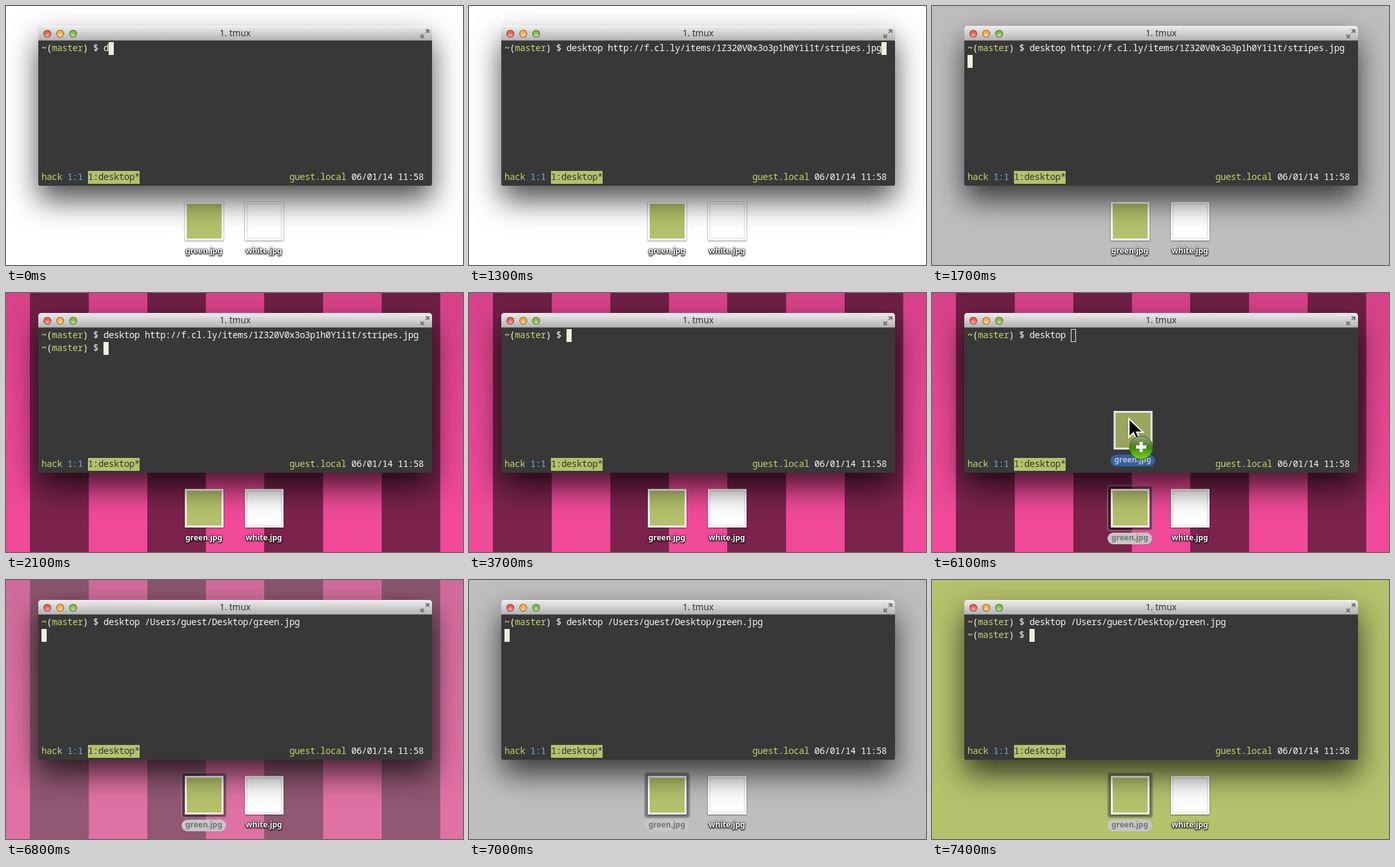
These frames come from a looping animation (708x402 px, 8 s). An HTML page:

```html
<!DOCTYPE html>
<html lang="en">
<head>
<meta charset="utf-8">
<title>Desktop from the terminal</title>
<style>
  html, body { margin: 0; width: 100%; height: 100%; overflow: hidden; }
  body { position: relative; background: #fff; font-family: "Noto Sans", "Open Sans", sans-serif; }
  div, svg { position: absolute; box-sizing: border-box; }
  .wallpaper { inset: 0; }
  #stripes {
    left: -144.5px;
    background:
      linear-gradient(rgba(0, 0, 0, .1), transparent 85%),
      repeating-linear-gradient(90deg, #7b234c 0 90.2px, #f04a98 91.3px 181px, #7b234c 181.5px);
  }
  #green { background: #b4c26c; }
  #gray { background: #bebebe; }

  .file { top: 304px; width: 60px; height: 60px; }
  .picture {
    inset: 0; border: 3px solid #fff; background: var(--fill);
    box-shadow: 0 0 1px rgba(0, 0, 0, .5), 0 1px 2px rgba(0, 0, 0, .4);
  }
  .picture.framed { box-shadow: 0 0 1px rgba(0, 0, 0, .5), 0 1px 2px rgba(0, 0, 0, .4), inset 0 0 0 1px #ddd; }
  .label {
    left: -5px; top: 68px; width: 69px; height: 18px; border-radius: 9px;
    font-weight: bold; font-size: 12px; line-height: 15px; text-align: center;
    color: #fff; text-shadow: 0 1px 2px #000, 0 0 3px #000, 0 1px 3px rgba(0, 0, 0, .7);
  }
  .selected::before {
    content: ""; position: absolute; inset: -6px; border-radius: 5px;
    border: 2px solid rgba(140, 140, 140, .6); background: rgba(0, 0, 0, .35); background-clip: padding-box;
  }
  .selected .label { background: #c6c6c6; color: #747474; text-shadow: none; }
  #dragged .label { background: #2f69b5; color: #d3d9e0; text-shadow: none; }
  #dragged { opacity: .86; }
  #dragged .picture { box-shadow: none; }

  #window {
    left: 50px; top: 31px; width: 610px; height: 248px; border-radius: 5px 5px 3px 3px;
    background: #383838;
    box-shadow: 0 22px 46px rgba(0, 0, 0, .7);
  }
  #titlebar {
    left: 0; top: 0; width: 100%; height: 23px; border-radius: 5px 5px 0 0;
    background: linear-gradient(#ededed, #b4b4b4); border-bottom: 1px solid #777;
    font-size: 13.5px; line-height: 23px; text-align: center; color: #333;
    box-shadow: inset 0 1px #f8f8f8;
  }
  .light {
    top: 6px; width: 12px; height: 12px; border-radius: 50%;
    border: 1px solid rgba(60, 30, 20, .55);
    background: radial-gradient(circle at 50% 85%, rgba(255, 255, 255, .55), transparent 60%), var(--color);
  }
  .row {
    left: 5px; height: 20px; white-space: pre; color: #f8f8f8;
    font: 500 14px/18px "Noto Sans Mono", "DejaVu Sans Mono", monospace; letter-spacing: -.4px;
  }
  .lime { color: #c2d76e; }
  .gold { color: #f0cf66; font-weight: bold; }
  .blue { color: #7ba8d2; }
  .tag { display: inline-block; height: 20px; vertical-align: top; background: #b4c26c; color: #333; }
  .cursor { display: inline-block; width: 8px; height: 20px; vertical-align: top; box-sizing: border-box; background: #f2ece2; }
  .cursor.hollow { background: none; border: 1px solid #f2ece2; }
  #pointer { left: 0; top: 0; overflow: visible; }
</style>
</head>
<body>
  <div class="wallpaper" id="stripes"></div>
  <div class="wallpaper" id="green"></div>
  <div class="wallpaper" id="gray"></div>

  <div class="file" id="source" style="left:277px; --fill:#b4c26c">
    <div class="picture"></div><div class="label">green.jpg</div>
  </div>
  <div class="file" style="left:370px; --fill:#fff">
    <div class="picture framed"></div><div class="label">white.jpg</div>
  </div>

  <div id="window">
    <div id="titlebar">1. tmux
      <div class="light" style="left:8px; --color:#ed5a50"></div>
      <div class="light" style="left:28px; --color:#f3ae3c"></div>
      <div class="light" style="left:48px; --color:#7dbb43"></div>
      <svg style="left:591px; top:4px" width="16" height="16" viewBox="0 0 14 14" fill="#777" stroke="#777" stroke-width="1.6">
        <path d="M7 1H13V7ZM1 7V13H7Z" stroke="none"/>
        <path d="M8 6L11 3M3 11L6 8"/>
      </svg>
    </div>
    <div class="row" id="first" style="top:25px"></div>
    <div class="row" id="second" style="top:45px"></div>
    <div class="row" style="top:225px"><span class="lime">hack</span> <span class="blue">1:1</span> <span class="tag">1:desktop*</span></div>
    <div class="row" style="top:225px; left:389px"><span class="lime">guest.local</span> 06/01/14 11:58</div>
  </div>

  <div class="file" id="dragged" style="left:277px; --fill:#aab762">
    <div class="picture"></div><div class="label">green.jpg</div>
  </div>

  <svg id="pointer" width="40" height="70">
    <defs>
      <linearGradient id="badgeFill" x2="0" y2="1">
        <stop offset="0" stop-color="#98a58e"/><stop offset=".42" stop-color="#4f8428"/>
        <stop offset=".5" stop-color="#3a8a08"/><stop offset="1" stop-color="#84d01c"/>
      </linearGradient>
    </defs>
    <g id="beam" fill="none" stroke-linecap="round">
      <path d="M-5 -14Q0 -14 0 -9V9Q0 14 -5 14M6 -14Q0 -14 0 -9M0 9Q0 14 6 14M-2 1H2" stroke="#222" stroke-width="5" stroke-opacity=".6" transform="translate(1 1)"/>
      <path d="M-5 -14Q0 -14 0 -9V9Q0 14 -5 14M6 -14Q0 -14 0 -9M0 9Q0 14 6 14M-2 1H2" stroke="#ccc" stroke-width="2.5"/>
    </g>
    <path id="arrow" d="M0 0V29L7 22L11 31L16 29L12 21H22Z" fill="#000" stroke="#fff" stroke-width="2"/>
    <g id="badge" transform="translate(19 45)">
      <circle r="18" fill="url(#badgeFill)" stroke="#286808"/>
      <path d="M-8 -1H8M0 -9V7" stroke="#fff" stroke-width="5"/>
    </g>
  </svg>

<script>
const LOOP = 8000;
const WEB_COMMAND = "desktop http://f.cl.ly/items/1Z320V0x3o3p1h0Y1i1t/stripes.jpg";
const FILE_COMMAND = "desktop /Users/guest/Desktop/green.jpg ";
const PROMPT = '<span class="gold">~</span>(<span class="lime">master</span>) $ ';
const GRAB = { x: 300.5, y: 316 };

// Each track lists [start time, value...] and holds until the next entry.
const typed = [
  [0, 1], [100, 2], [200, 3], [500, 4], [600, 5], [900, 7], [1100, 8], [1300, 61],
  [3700, 0], [4000, 1], [4200, 2], [4300, 3], [4500, 4], [4700, 5], [4800, 6], [4900, 7], [5200, 8], [6400, 39]
];
const secondLine = [[0, "none"], [1600, "cursor"], [2100, "prompt"], [3700, "none"], [6800, "cursor"], [7400, "prompt"]];
const grayLevel = [
  [0, 0], [1600, .5], [1700, 1], [2000, .5], [2100, 0],
  [6800, .33], [6900, .67], [7000, 1], [7300, .5], [7400, 0]
];
const pointerPath = [
  [0], [5200, 334, 178], [5300, 341, 212], [5400, 324, 268], [5500, 305, 310], [5600, 300.5, 316],
  [5700, 301, 313], [5800, 302, 302], [5900, 303, 284], [6000, 304, 259],
  [6100, 305, 195], [6200, 305, 180], [6300, 305, 174], [6400]
];

const el = id => document.getElementById(id);
const valuesAt = (track, t) => track.findLast(([start]) => start <= t).slice(1);
const show = (id, visible) => { el(id).style.display = visible ? "" : "none"; };

function setHtml(id, html) {
  const node = el(id);
  if (node.dataset.html !== html) node.innerHTML = node.dataset.html = html;
}

function drawTerminal(t) {
  const [count] = valuesAt(typed, t);
  const [second] = valuesAt(secondLine, t);
  const hollow = t >= 5600 && t < 6400;
  const cursor = `<span class="cursor${hollow ? " hollow" : ""}"></span>`;
  const command = (t < 3700 ? WEB_COMMAND : FILE_COMMAND).slice(0, count);
  setHtml("first", PROMPT + command + (second === "none" ? cursor : ""));
  setHtml("second", second === "none" ? "" : (second === "prompt" ? PROMPT : "") + cursor);
}

function drawPointer(t) {
  const [x, y] = valuesAt(pointerPath, t);
  const visible = x !== undefined;
  const dragging = visible && t >= 5600;
  const overWindow = y < 278;
  show("pointer", visible);
  show("dragged", dragging);
  show("beam", !dragging && overWindow);
  show("arrow", dragging || !overWindow);
  show("badge", dragging && overWindow);
  el("source").classList.toggle("selected", t >= 5600);
  if (!visible) return;
  el("pointer").style.transform = `translate(${x}px, ${y}px)`;
  el("dragged").style.transform = `translate(${x - GRAB.x}px, ${y - GRAB.y}px)`;
}

function draw(now) {
  const t = now % LOOP;
  show("stripes", t >= 2000 && t < 7300);
  show("green", t >= 7300);
  el("gray").style.opacity = valuesAt(grayLevel, t)[0];
  drawTerminal(t);
  drawPointer(t);
}

const begin = performance.now();
function tick() {
  draw(performance.now() - begin);
  requestAnimationFrame(tick);
}
tick();
</script>
</body>
</html>
```
